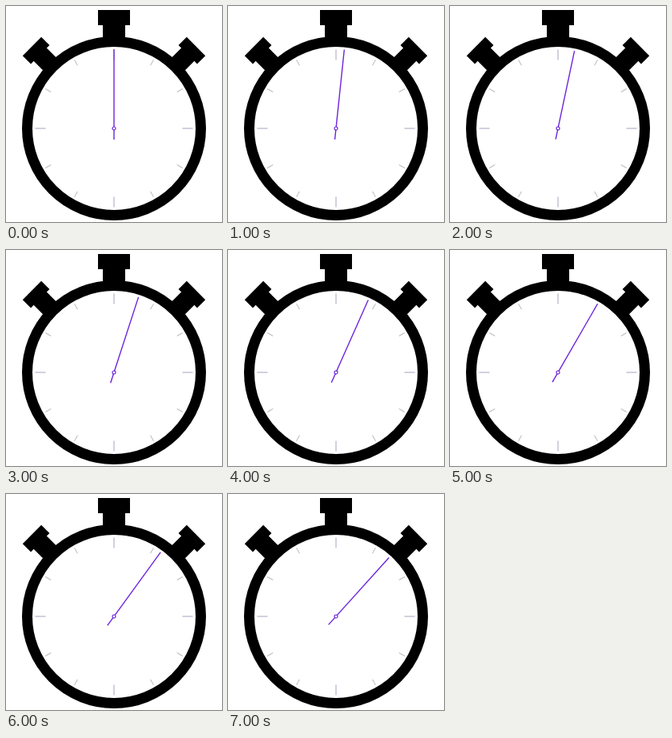
Write an HTML page that moves like this. It is 270 px wide and 270 px high and loops after 8000 ms.

```html
<!DOCTYPE html>
<html lang="en">
<head>
<meta charset="utf-8">
<title>Stopwatch</title>
<style>
  html, body { margin: 0; height: 100%; overflow: hidden; background: #fff; }
  svg { display: block; width: 100vw; height: 100vh; }
</style>
</head>
<body>
<svg viewBox="0 0 270 270">
  <g transform="translate(135 153)">
    <path d="M-20-148h40v19h-6v20h-28v-20h-6z"/>
    <path id="button" d="M-16.5-145h33v14.5h-5v24h-23v-24h-5z" transform="rotate(-45)"/>
    <use href="#button" transform="rotate(90)"/>
    <circle r="108.5" fill="#fff" stroke="#000" stroke-width="13"/>
    <g id="ticks"></g>
    <g id="hand" stroke="#6d24dc" stroke-width="1.4">
      <path d="M0 14V-99"/>
      <circle r="2" fill="#fff" stroke-width="1.2"/>
    </g>
  </g>
</svg>
<script>
  const LOOP = 8000;
  const STEP = 1000;
  const hand = document.getElementById('hand');

  document.getElementById('ticks').innerHTML = Array.from({ length: 12 }, (_, hour) => {
    const major = hour % 3 === 0;
    const [inner, outer, color] = major ? [85.5, 98.5, '#a99fc0'] : [91, 99, '#bcbcc2'];
    return `<path d="M0-${inner}V-${outer}" stroke="${color}" transform="rotate(${hour * 30})"/>`;
  }).join('');

  function draw(now) {
    const second = Math.floor((now % LOOP) / STEP);
    hand.setAttribute('transform', `rotate(${second * 6})`);
    requestAnimationFrame(draw);
  }
  requestAnimationFrame(draw);
</script>
</body>
</html>
```
